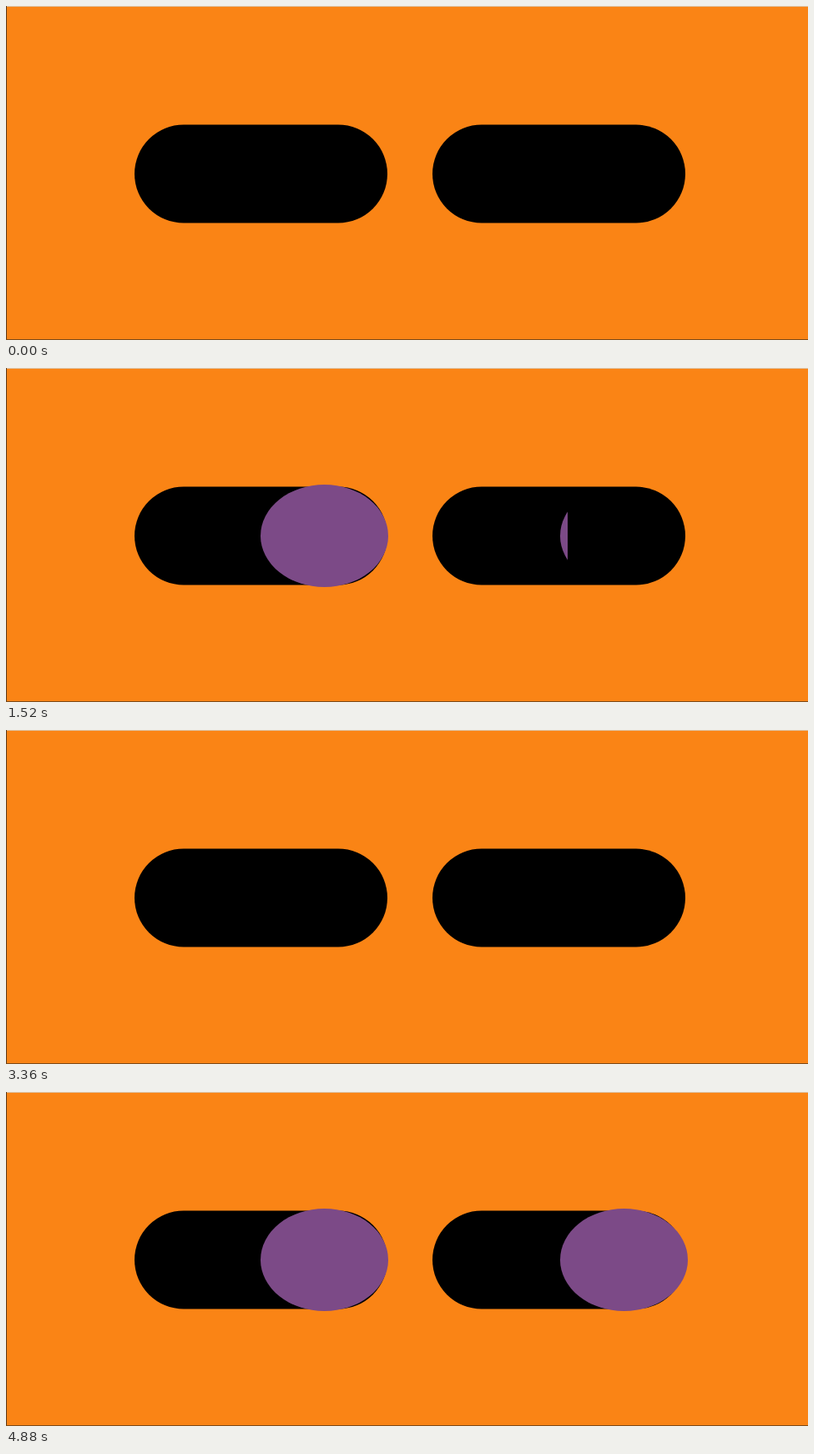
An HTML page for the animation above (5 s loop, 961x401 px).

```html
<!DOCTYPE html>
<html lang="en">
<head>
<meta charset="utf-8">
<title>Two pills</title>
<style>
  html, body { margin: 0; width: 100%; height: 100%; overflow: hidden; background: #fa8415; }
  svg { display: block; }
</style>
</head>
<body>
<svg width="961" height="401" viewBox="0 0 961 401">
  <defs>
    <clipPath id="leftClip"><rect id="leftWindow" y="0" height="401"/></clipPath>
    <clipPath id="rightClip"><rect id="rightWindow" x="664" y="0" height="401"/></clipPath>
  </defs>
  <rect width="961" height="401" fill="#fa8415"/>
  <rect width="961" height="1" fill="#dcc0a0"/>
  <rect width="1" height="401" fill="#5c3a1a"/>
  <rect y="400" width="961" height="1" fill="#7a4a1a"/>
  <rect x="154" y="142.5" width="303" height="118" rx="59"/>
  <rect x="511" y="142.5" width="303" height="118" rx="59"/>
  <g fill="#7c4a87">
    <ellipse cx="381.5" cy="201.5" rx="76.5" ry="61.5" clip-path="url(#leftClip)"/>
    <ellipse cx="740.5" cy="201.5" rx="76.5" ry="61.5" clip-path="url(#rightClip)"/>
  </g>
</svg>
<script>
const LOOP = 5000, CYCLE = 1120, STEP = 40;
const DISC = 153, LEFT_DISC_END = 458;
const leftWindow = document.getElementById('leftWindow');
const rightWindow = document.getElementById('rightWindow');

// Start and end of the reveal within each cycle, in ms.
const reveals = [[0, 520], [40, 720], [40, 720], [40, 720], [7, 400]];

const clamp = v => Math.min(1, Math.max(0, v));

function draw(ms) {
  const time = Math.floor(ms % LOOP / STEP) * STEP;
  const [start, end] = reveals[Math.floor(time / CYCLE)];

  // The first half uncovers the left disc, the second half the right one.
  const progress = 2 * (time % CYCLE - start) / (end - start);
  const left = Math.round(DISC * clamp(progress));
  const right = Math.round(DISC * clamp(progress - 1));

  leftWindow.setAttribute('x', LEFT_DISC_END - left);
  leftWindow.setAttribute('width', left);
  rightWindow.setAttribute('width', right);
}

let origin;
function tick(now) {
  origin ??= now;
  draw(now - origin);
  requestAnimationFrame(tick);
}
draw(0);
requestAnimationFrame(tick);
</script>
</body>
</html>
```
